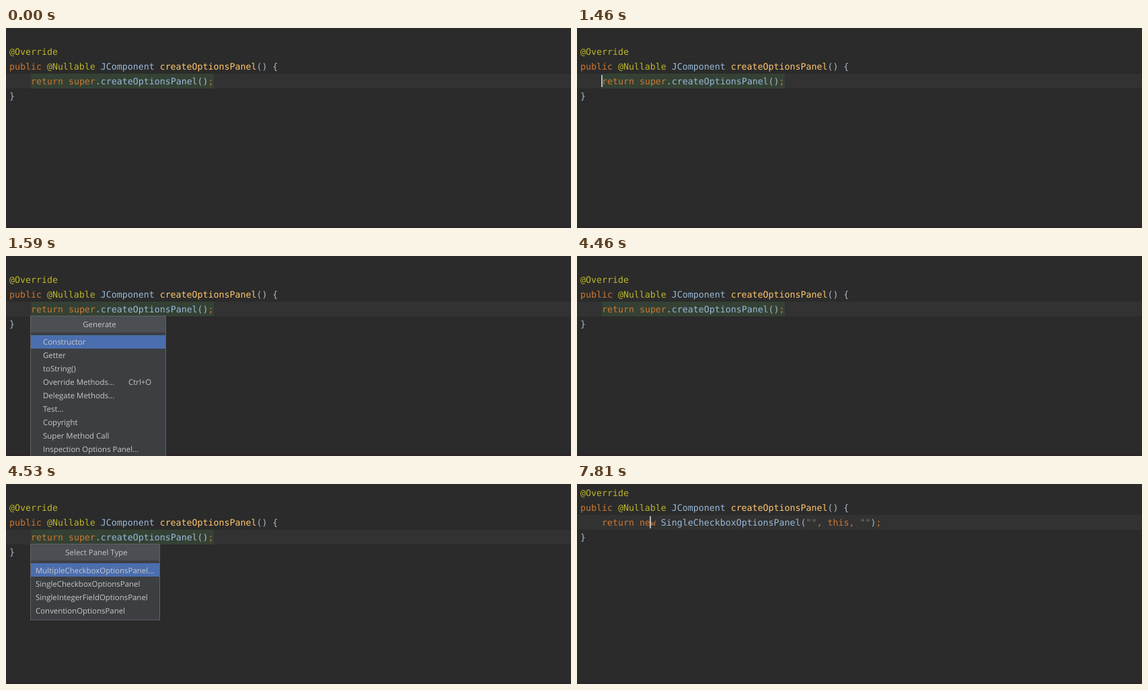
An HTML page that plays this animation: 840 px wide and 298 px high, repeating every 8 s.

```html
<!DOCTYPE html>
<html lang="en">
<head>
<meta charset="utf-8">
<title>Generate options panel</title>
<style>
html, body { margin: 0; width: 100%; height: 100%; overflow: hidden; background: #2b2b2b; }
svg { display: block; }
text { white-space: pre; fill: #c8c8c8; font: 11.45px "Open Sans", "Noto Sans", sans-serif; text-rendering: geometricPrecision; }
.code { fill: #a9b7c6; font: 13.288px "DejaVu Sans Mono", "Noto Sans Mono", monospace; }
.key { fill: #cc7832; }
.note { fill: #bbb529; }
.type { fill: #98b9d8; }
.decl { fill: #ffc66d; }
.str { fill: #6a8759; }
</style>
</head>
<body>
<svg id="stage" width="840" height="298"></svg>
<script>
const LOOP = 8000;
const stage = document.getElementById('stage');

const rect = (x, y, w, h, fill) =>
  `<rect x="${x}" y="${y}" width="${w}" height="${h}" fill="${fill}"/>`;
const label = (x, y, s, extra = '') => `<text x="${x}" y="${y}" ${extra}>${s}</text>`;
const span = (cls, s) => `<tspan class="${cls}">${s}</tspan>`;

const callLine = span('key', 'return super') + '.' + span('type', 'createOptionsPanel') + '()' + span('key', ';');
const newLine = span('key', 'return new ') + span('type', 'SingleCheckboxOptionsPanel') + '(' +
  span('str', '""') + span('key', ', this, ') + span('str', '""') + ')' + span('key', ';');

// top is the upper edge of the current line
function editor(top, body, marked, caretX) {
  const lines = [
    [5, span('note', '@Override')],
    [5, span('key', 'public ') + span('note', '@Nullable ') + span('type', 'JComponent ') +
      span('decl', 'createOptionsPanel') + '() {'],
    [37, body],
    [5, '}']
  ];
  return rect(0, top, 840, 22, '#323232') +
    (marked ? rect(37, top, 272, 22, '#344134') : '') +
    lines.map(([x, s], i) => label(x, top + 16 + (i - 2) * 22, s, 'class="code"')).join('') +
    rect(0, 294, 840, 4, '#2c2529') +
    (caretX ? rect(caretX, top + 2, 2, 18, '#bbb') : '');
}

function popup(title, items, selected, { w, h, x, base }) {
  return rect(36, 89, w, h, '#616365') +
    rect(37, 90, w - 2, h - 2, '#3c3e41') +
    rect(37, 90, w - 2, 24, '#4b4e52') +
    label(36 + w / 2 + 2, 106, title, 'text-anchor="middle"') +
    rect(37, 118 + selected * 20, w - 2, 20, '#4b6eaf') +
    items.map((s, i) => label(x, base + i * 20, s)).join('');
}

const generate = selected => popup('Generate',
  ['Constructor', 'Getter', 'toString()', 'Override Methods...', 'Delegate Methods...',
    'Test...', 'Copyright', 'Super Method Call', 'Inspection Options Panel...'],
  selected, { w: 202, h: 230, x: 55, base: 132 }) + label(182, 192, 'Ctrl+O');

const panelType = selected => popup('Select Panel Type',
  ['MultipleCheckboxOptionsPanel...', 'SingleCheckboxOptionsPanel',
    'SingleIntegerFieldOptionsPanel', 'ConventionOptionsPanel'],
  selected, { w: 193, h: 114, x: 44, base: 133 });

const before = editor(68, callLine, true);
const withCaret = editor(68, callLine, true, 36);
const scenes = [
  [0, before],
  [460, withCaret],
  [990, before],
  [1460, withCaret],
  [1590, before + generate(0)],
  [2520, before + generate(8)],
  [4460, before],
  [4530, before + panelType(0)],
  [5940, before + panelType(1)],
  [7810, editor(46, newLine, false, 108)]
];

let shown;
function draw() {
  const t = performance.now() % LOOP;
  const scene = scenes.findLast(([start]) => start <= t);
  if (scene !== shown) {
    shown = scene;
    stage.innerHTML = scene[1];
  }
  requestAnimationFrame(draw);
}
draw();
</script>
</body>
</html>
```
